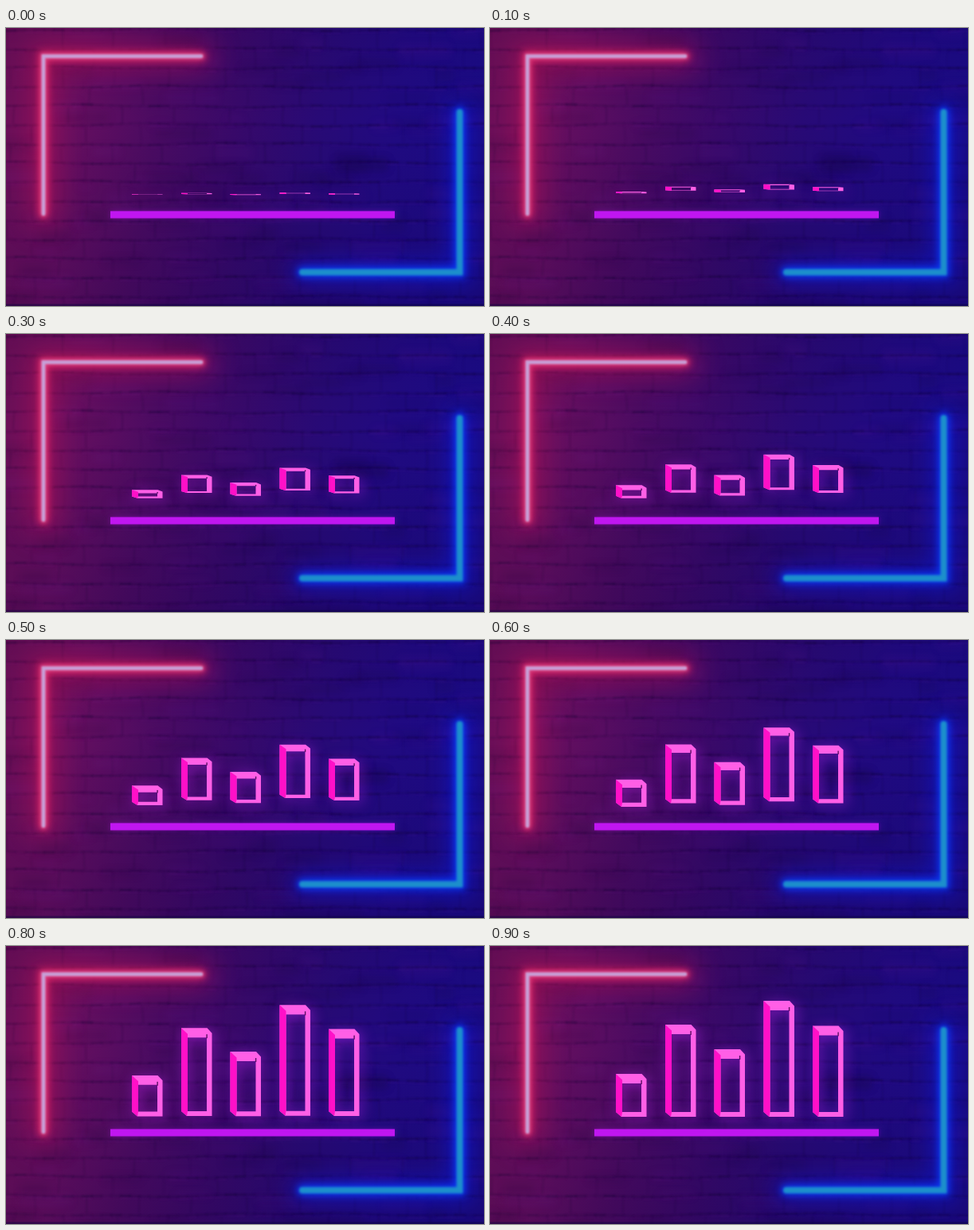
Write an HTML page with a canvas that moves like this. It is 600 px wide and 350 px high and loops after 950 ms.

```html
<!DOCTYPE html>
<html lang="en">
<head>
<meta charset="utf-8">
<title>Neon bars</title>
<style>
html, body { margin: 0; width: 100%; height: 100%; overflow: hidden; background: #2c0a66; }
canvas { display: block; width: 600px; height: 350px; }
</style>
</head>
<body>
<canvas id="stage" width="600" height="350"></canvas>
<script>
const W = 600, H = 350, LOOP = 950, STEP = 50;
const ctx = document.getElementById('stage').getContext('2d');

// Left edge, final height and final middle of each bar, and the line it rises from
const BARS = [
  { x: 158, h: 54, mid: 188, from: 210 },
  { x: 220, h: 116, mid: 157, from: 209 },
  { x: 281.5, h: 85, mid: 172.5, from: 210 },
  { x: 343.5, h: 146, mid: 142, from: 208.8 },
  { x: 405, h: 114.5, mid: 157.7, from: 209.5 }
];
// One value per 100 ms
const GROW = [.012, .045, .1, .195, .305, .459, .637, .829, .955, 1];
const RISE = [.01, .13, .26, .39, .52, .65, .78, .9, .97, 1];

function sample(table, ms) {
  const p = Math.min(ms / 100, table.length - 1);
  const i = Math.min(Math.floor(p), table.length - 2);
  return table[i] + (table[i + 1] - table[i]) * (p - i);
}

function randomizer(seed) {
  return () => {
    seed = (seed * 1664525 + 1013904223) >>> 0;
    return seed / 4294967296;
  };
}

function gradient(g, x0, y0, x1, y1, colors) {
  const fill = g.createLinearGradient(x0, y0, x1, y1);
  colors.forEach((c, i) => fill.addColorStop(i / (colors.length - 1), c));
  return fill;
}

function drawWall(g) {
  g.fillStyle = gradient(g, 0, 0, 600, 90,
    ['#6c0f57', '#660f60', '#4b0b62', '#38096a', '#280a76', '#200a82', '#1a0b86']);
  g.fillRect(0, 0, W, H);
  g.fillStyle = gradient(g, 0, 0, 0, H,
    ['rgba(20,0,50,.1)', 'rgba(20,0,50,0)', 'rgba(20,0,60,.1)', 'rgba(20,0,60,.2)']);
  g.fillRect(0, 0, W, H);

  const rnd = randomizer(41);
  g.lineCap = 'round';
  g.filter = 'blur(0.8px)';
  for (let row = 0; row < 15; row++) {
    const y = 2 + row * 24, phase = rnd() * 6;
    const wave = x => y + Math.sin(x / 70 + phase) * 1.3 + Math.sin(x / 23 + phase * 2) * .7;
    for (let x = 0; x < W; x += 12) {
      g.beginPath();
      g.moveTo(x, wave(x));
      g.lineTo(x + 12, wave(x + 12));
      g.strokeStyle = `rgba(16,2,48,${.16 + rnd() * .26})`;
      g.lineWidth = 1 + rnd() * 1.4;
      g.stroke();
      g.beginPath();
      g.moveTo(x, wave(x) + 3);
      g.lineTo(x + 12, wave(x + 12) + 3);
      g.strokeStyle = `rgba(150,50,190,${rnd() * .08})`;
      g.stroke();
    }
    for (let x = (row % 2) * 32 + rnd() * 10; x < W; x += 62 + rnd() * 8) {
      g.beginPath();
      g.moveTo(x, y + 2);
      g.lineTo(x + rnd() * 2 - 1, y + 22);
      g.strokeStyle = `rgba(16,2,48,${.06 + rnd() * .16})`;
      g.lineWidth = 1.4;
      g.stroke();
    }
  }
  g.filter = 'blur(5px)';
  for (let i = 0; i < 90; i++) {
    g.fillStyle = i % 2 ? 'rgba(14,0,44,.1)' : 'rgba(130,30,170,.07)';
    g.fillRect(rnd() * W - 20, rnd() * H, 20 + rnd() * 50, 5 + rnd() * 14);
  }
  g.filter = 'none';
  g.fillStyle = 'rgba(10,6,60,.45)';
  g.fillRect(0, 347.5, W, 2.5);
}

// Each layer: width, blur, colour
function drawTube(g, points, layers) {
  g.lineCap = 'round';
  g.lineJoin = 'miter';
  for (const [width, blur, color] of layers) {
    g.filter = `blur(${blur}px)`;
    g.lineWidth = width;
    g.strokeStyle = color;
    g.beginPath();
    points.forEach(([x, y]) => g.lineTo(x, y));
    g.stroke();
  }
  g.filter = 'none';
}

function makeScene() {
  const layer = document.createElement('canvas');
  layer.width = W;
  layer.height = H;
  const g = layer.getContext('2d');
  drawWall(g);
  drawTube(g, [[47, 234], [47, 35.5], [245, 35.5]], [
    [34, 17, 'rgba(215,20,85,.42)'],
    [13, 5, 'rgba(232,40,105,.8)'],
    [7, 2, 'rgba(226,90,150,.8)'],
    [4.5, 1.1, '#c6a0d8']
  ]);
  drawTube(g, [[569.5, 106], [569.5, 307.5], [372, 307.5]], [
    [30, 13, 'rgba(10,30,235,.45)'],
    [14, 4, 'rgba(10,60,255,.85)'],
    [8, 1.5, '#1c8fcb']
  ]);
  g.shadowColor = 'rgba(190,20,255,.35)';
  g.shadowBlur = 6;
  g.fillStyle = '#c016f0';
  g.fillRect(131, 230.5, 357, 9);
  return layer;
}

function polygon(path, points) {
  points.forEach(([x, y], i) => i ? path.lineTo(x, y) : path.moveTo(x, y));
  path.closePath();
}

function drawBar(bar, grow, rise) {
  const h = bar.h * grow;
  const k = 1 - (1 - grow) ** 2;
  const cap = 12 * k, foot = 6 * k, slant = 6.5 * k;
  const shell = new Path2D(), side = new Path2D();
  polygon(shell, [[0, 0], [32.5, 0], [38.5, slant], [38.5, h], [7, h], [0, h - foot]]);
  polygon(shell, [[8, cap], [32, cap], [32, h - foot], [8, h - foot]]);
  polygon(side, [[0, 0], [8, slant + k], [8, h - foot], [7, h], [0, h - foot]]);

  ctx.save();
  ctx.translate(bar.x, bar.from + (bar.mid - bar.from) * rise - h / 2);
  ctx.shadowColor = 'rgba(205,40,255,.5)';
  ctx.shadowBlur = 16;
  ctx.shadowOffsetX = 3;
  ctx.shadowOffsetY = 3;
  ctx.fillStyle = '#ff5fe6';
  ctx.fill(shell, 'evenodd');
  ctx.shadowColor = 'transparent';
  ctx.fillStyle = '#ff10c8';
  ctx.fill(side);
  ctx.fillStyle = '#5a0f64';
  ctx.fillRect(31.4, 8 * k, 1.4, 5 * k);
  ctx.restore();
}

const scene = makeScene();

function frame() {
  const ms = Math.floor(performance.now() % LOOP / STEP) * STEP;
  const grow = sample(GROW, ms), rise = sample(RISE, ms);
  ctx.drawImage(scene, 0, 0);
  BARS.forEach(bar => drawBar(bar, grow, rise));
  requestAnimationFrame(frame);
}
frame();
</script>
</body>
</html>
```
